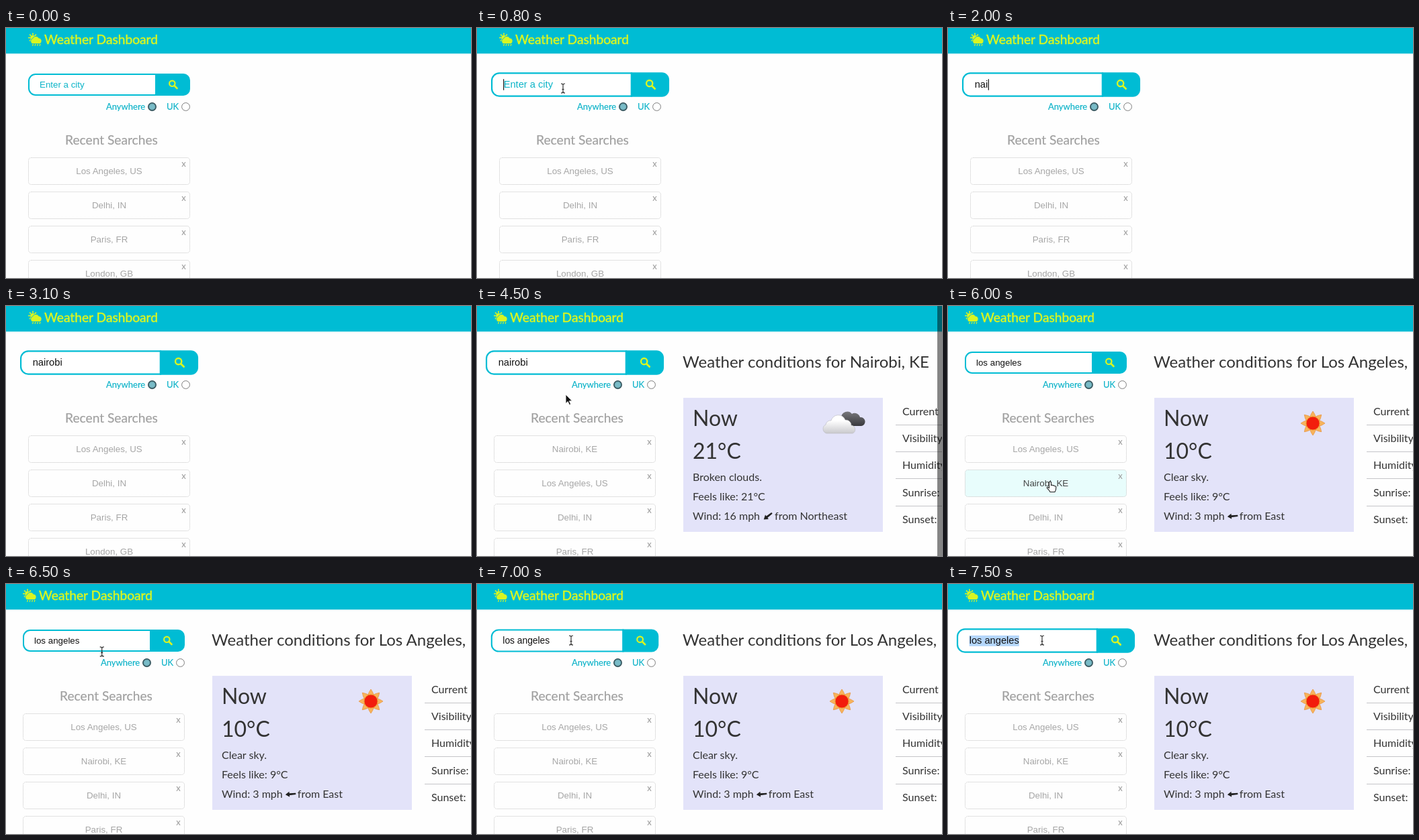
An HTML page that plays this animation: 692x373 px, repeating every 8 s.

```html
<!DOCTYPE html>
<html lang="en">
<head>
<meta charset="utf-8">
<title>Weather Dashboard</title>
<style>
html, body { margin: 0; width: 100%; height: 100%; overflow: hidden; background: #fefefe; }
svg { display: block; }
text { font-family: Lato, sans-serif; font-size: 16px; fill: #333; }
.ui { font-family: "Liberation Sans", Arial, sans-serif; font-size: 13.333px; }
.title { font-size: 19.2px; fill: #d8f522; stroke: #d8f522; stroke-width: .5; }
.label { font-size: 13px; fill: #0bb2c8; stroke: #0bb2c8; stroke-width: .15; }
.recent { font-size: 19.2px; fill: #a0a0a0; stroke: #a0a0a0; stroke-width: .2; }
.item { fill: #a6a6a6; text-anchor: middle; }
.close { font-size: 13px; fill: #999; text-anchor: middle; }
.head { font-size: 24px; }
.big { font-size: 32px; }
</style>
</head>
<body>
<svg id="stage" width="692" height="373" viewBox="0 0 692 373">
  <defs>
    <linearGradient id="pale" x2="0" y2="1">
      <stop offset=".3" stop-color="#fff"/><stop offset="1" stop-color="#c9c9cd"/>
    </linearGradient>
    <linearGradient id="dark" x2="0" y2="1">
      <stop offset="0" stop-color="#77777b"/><stop offset="1" stop-color="#39393d"/>
    </linearGradient>
  </defs>
  <rect y="38" width="692" height="1.5" fill="#d5f1f5"/>
  <rect width="692" height="38" fill="#00bcd4"/>

  <g id="page">
    <g id="logo" fill="#d8f522">
      <circle cx="40" cy="14.5" r="3.8"/>
      <g id="rays" stroke="#d8f522" stroke-width="1.7"></g>
      <path d="M39 23.5a4.2 4.2 0 0 1 .6-7.8a5 5 0 0 1 9-.9a4.6 4.6 0 0 1 2 8.7z" stroke="#00bcd4" stroke-width=".8"/>
      <path d="M40.5 24l-1 2.6M44 24l-1 2.6M47.500 24l-1 2.600M51 24l-1 2.600" stroke="#d8f522" stroke-width="1.300"/>
    </g>
    <text class="title" x="57" y="24">Weather Dashboard</text>

    <g id="search">
      <path d="M223 69H44a10 10 0 0 0-10 10v11a10 10 0 0 0 10 10H223z" fill="#fff" stroke="#00bcd4" stroke-width="2"/>
      <path d="M222 68h42a10 10 0 0 1 10 10v13a10 10 0 0 1-10 10h-42z" fill="#00bcd4"/>
      <circle cx="247.300" cy="82.800" r="4.200" fill="none" stroke="#d8f522" stroke-width="2.200"/>
      <path d="M250.500 86l4 4" stroke="#d8f522" stroke-width="2.600" stroke-linecap="round"/>
      <rect id="mark" x="50" y="77.500" height="14.500" fill="#b4d6fb"/>
      <text id="query" class="ui" x="50" y="89"></text>
      <rect id="caret" y="77" width="1" height="15" fill="#000"/>
    </g>

    <text class="label" x="149" y="122">Anywhere</text>
    <circle cx="217.500" cy="117.500" r="5.700" fill="#6fa9b3" stroke="#2d4c54" stroke-width="1.500"/>
    <circle cx="217.500" cy="117.500" r="3.600" fill="#79bcc8"/>
    <text class="label" x="239" y="122">UK</text>
    <circle cx="267.500" cy="117.500" r="5.900" fill="#fff" stroke="#7c7c7c"/>
    <text class="recent" x="88" y="174">Recent Searches</text>
    <g id="list"></g>
  </g>

  <g id="report">
    <text id="place" class="head" x="306" y="92"></text>
    <rect x="307" y="137" width="297" height="200" fill="#e3e3f9"/>
    <text class="big" x="321" y="179">Now</text>
    <text id="temp" class="big" x="321" y="227.500"></text>
    <text id="sky" x="321" y="261"></text>
    <text id="feels" x="321" y="290"></text>
    <text id="wind" x="321" y="319"></text>
    <path id="arrow" d="M-8 0L-2-4V-1.500L7.500-1.200V1.200L-2 1.500V4z" fill="#222"/>
    <text id="from" y="319"></text>
    <g id="clouds">
      <path d="M541 179a7 7 0 0 1 1-13a9 9 0 0 1 16-5a8 8 0 0 1 12 5a6.500 6.500 0 0 1 2 13z" fill="url(#dark)"/>
      <path d="M520 190a7 7 0 0 1-1-13a7 7 0 0 1 8-6a11 11 0 0 1 21-1a8 8 0 0 1 9 8a6.300 6.300 0 0 1 2 12z" fill="url(#pale)" stroke="#b9b9be" stroke-width=".6"/>
    </g>
    <g id="sun" transform="translate(543 175)"></g>
    <g id="rows"></g>
  </g>
  <rect id="edge" x="685" width="7" height="373" fill="#000" opacity=".48"/>

  <g id="cursor">
    <path id="point" d="M0 0V13.500L3.200 10.600L5.400 15.600L7.600 14.600L5.400 9.800H9.600z" fill="#111" stroke="#fff" stroke-width=".9"/>
    <path id="beam" d="M-3-7Q0-7 0-5Q0-7 3-7M0-5V5M-3 7Q0 7 0 5Q0 7 3 7M-1.500 1.500H1.500" fill="none" stroke="#222" stroke-width="1.100"/>
    <path id="hand" d="M-1.500 7V.8Q0-1 1.500.8V5.500Q3 4.200 4.200 6Q5.600 5 6.800 6.800Q8.800 6.300 8.800 8.500Q9 12.500 7 15.500H0Q-1.500 12.500-4.800 9.400Q-4.800 7-1.500 9.500z" fill="#fff" stroke="#222" stroke-width="1.100"/>
  </g>
</svg>
<script>
const LOOP = 8000, TICK = 100;
const $ = id => document.getElementById(id);
const show = (id, on) => $(id).setAttribute("visibility", on ? "visible" : "hidden");

function add(parent, tag, attrs, text = "") {
  const el = document.createElementNS("http://www.w3.org/2000/svg", tag);
  for (const k in attrs) el.setAttribute(k, attrs[k]);
  el.textContent = text;
  return parent.appendChild(el);
}

for (let i = 0; i < 8; i++) {
  add($("rays"), "path", { d: "M40 10.400V7.600", transform: `rotate(${i * 45} 40 14.500)` });
  add($("sun"), "path", {
    d: "M-4.500-9Q-3-14 0-18Q3-14 4.500-9z", fill: "#f7b45c", stroke: "#e8913a",
    "stroke-width": .7, transform: `rotate(${i * 45})`
  });
}
add($("sun"), "circle", { r: 10, fill: "#f21d0c", stroke: "#f08a2c" });

["Current", "Visibility", "Humidity:", "Sunrise:", "Sunset:"].forEach((name, i) => {
  const y = 163 + i * 40.2;
  add($("rows"), "text", { x: 633, y }, name);
  if (i < 4) add($("rows"), "rect", { x: 623, y: Math.round(y + 14), width: 69, height: 1, fill: "#c4c4c8" });
});

const items = [0, 1, 2, 3].map(i => {
  const y = 193 + i * 51, list = $("list");
  const box = add(list, "rect", {
    x: 33.5, y: y + .5, width: 240, height: 40, rx: 4, stroke: "#c6c6c6", "stroke-dasharray": "1 1"
  });
  const label = add(list, "text", { class: "ui item", x: 153.5, y: y + 25 });
  add(list, "text", { class: "close", x: 264.5, y: y + 14 }, "x");
  return { y, box, label };
});

const reports = [
  { place: "Nairobi, KE", temp: "21°C", sky: "Broken clouds.", feels: "21°C", wind: "16 mph", from: "Northeast", turn: -38 },
  { place: "Los Angeles, US", temp: "10°C", sky: "Clear sky.", feels: "9°C", wind: "3 mph", from: "East", turn: -5 }
];
const rest = ["Delhi, IN", "Paris, FR", "London, GB"];
const names = reports.map(r => r.place);
const lists = [[names[1], ...rest], [...names, ...rest], [names[1], names[0], ...rest]];

const KEYS = [1600, 1900, 2000, 2200, 2400, 2500, 2600];
const FIRST = 3300, SECOND = 5400;

// [time, x, y] of the pointer's hot spot
const PATH = [
  [100, 330, 150], [400, 140, 92], [800, 128, 90], [4500, 132, 132],
  [4900, 150, 256], [5200, 151, 262], [5800, 151, 262], [6000, 152, 262],
  [6600, 142, 88], [6800, 140, 84], [8000, 140, 84]
];
// [time, focus amount]
const FOCUS = [[0, 0], [400, 0], [650, 1], [5000, 1], [5250, 0], [6900, 0], [7150, 1], [8000, 1]];
// [time, caret visible]
const CARET = [
  [0, 0], [400, 1], [1200, 0], [1500, 1], [3100, 0], [3600, 1], [4100, 0],
  [4600, 1], [5000, 0], [6900, 0]
];

const smooth = p => p * p * (3 - 2 * p);

function tween(track, t) {
  let i = 1;
  while (i < track.length - 1 && t >= track[i][0]) i++;
  const a = track[i - 1], b = track[i];
  const p = smooth(Math.min(1, Math.max(0, (t - a[0]) / (b[0] - a[0]))));
  return a.slice(1).map((v, k) => v + (b[k + 1] - v) * p);
}

const step = (track, t) => track.filter(s => s[0] <= t).pop()[1];

function drawSearch(t) {
  const s = 1 + .1 * tween(FOCUS, t)[0];
  $("search").setAttribute("transform", `translate(153.5 84.5) scale(${s}) translate(-153.5 -84.5)`);
  const typed = t >= SECOND ? "los angeles" : "nairobi".slice(0, KEYS.filter(k => k <= t).length);
  const query = $("query");
  query.textContent = typed || "Enter a city";
  query.style.fill = typed ? "#111" : "#0cb4c8";
  const width = query.getComputedTextLength();
  $("mark").setAttribute("width", width);
  show("mark", t >= 7200);
  $("caret").setAttribute("x", typed ? 50.5 + width : 49.5);
  show("caret", step(CARET, t));
}

function drawList(t, x, y, active) {
  const list = lists[t < FIRST ? 0 : t < SECOND ? 1 : 2];
  items.forEach((item, i) => {
    const hover = active && x > 25 && x < 266 && y > item.y && y < item.y + 41;
    item.label.textContent = list[i];
    item.label.style.fill = hover ? "#444" : "";
    item.box.setAttribute("fill", hover ? "#e8fdfc" : "#fefefe");
  });
}

function drawReport(t) {
  show("report", t >= FIRST);
  const r = reports[t < SECOND ? 0 : 1];
  $("place").textContent = "Weather conditions for " + r.place;
  $("temp").textContent = r.temp;
  $("sky").textContent = r.sky;
  $("feels").textContent = "Feels like: " + r.feels;
  $("wind").textContent = "Wind: " + r.wind;
  const end = 321 + $("wind").getComputedTextLength();
  $("arrow").setAttribute("transform", `translate(${end + 12} 313.500) rotate(${r.turn})`);
  $("from").setAttribute("x", end + 22);
  $("from").textContent = "from " + r.from;
  show("clouds", t >= FIRST && t < SECOND);
  show("sun", t >= SECOND);
}

function drawCursor(x, y, active) {
  const kind = x > 266 ? "point" : y > 68 && y < 101 ? "beam" : y > 193 ? "hand" : "point";
  for (const id of ["point", "beam", "hand"]) show(id, active && id === kind);
  $("cursor").setAttribute("transform", `translate(${x} ${y})`);
}

function render(t) {
  const [x, y] = tween(PATH, t);
  const active = t >= 100 && t < 1600 || t >= 4500;
  // the pointer rests until it is moved again
  const at = t > 800 && t < 4500 ? [128, 90] : [x, y];
  $("page").setAttribute("transform", `translate(${t < FIRST ? 0 : -8} 0)`);
  drawSearch(t);
  drawList(t, ...at, active);
  drawReport(t);
  drawCursor(...at, active);
  show("edge", t >= FIRST && t < 4600);
}

const start = performance.now();
function frame(now) {
  const t = Math.max(0, now - start) % LOOP;
  render(Math.floor(t / TICK) * TICK);
  requestAnimationFrame(frame);
}
render(0);
requestAnimationFrame(frame);
</script>
</body>
</html>
```
